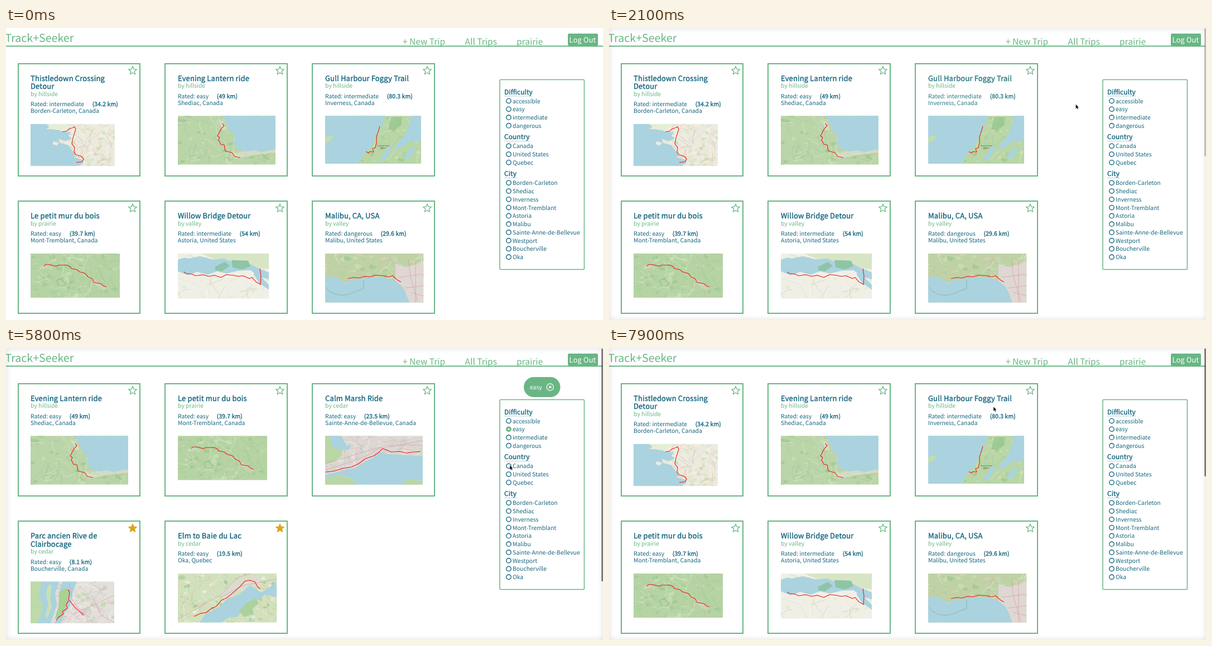
An HTML page that plays this animation: 1070x523 px, repeating every 8000 ms.

```html
<!DOCTYPE html>
<html lang="en">
<head>
<meta charset="utf-8">
<title>Trip list</title>
<style>
html, body { margin: 0; width: 100%; height: 100%; overflow: hidden; background: #fff; }
svg { display: block; --ink: #15667f; }
#stage { position: absolute; left: 0; top: 0; }
#edge { position: absolute; inset: 0; box-shadow: inset 0 0 12px rgba(0, 0, 0, .13); }
text {
  font-family: "Noto Sans CJK JP", "Noto Sans CJK SC", "Noto Sans CJK KR", "Noto Sans CJK", "Open Sans", sans-serif;
  font-size: 10.4px; text-rendering: geometricPrecision; white-space: pre;
}
.ink { fill: var(--ink); }
.brand { font-size: 19.6px; }
.nav { font-size: 15.5px; }
.out { font-size: 13.1px; }
/* A thin outline gives a semibold between regular and bold. */
.title, .head, .km { stroke: var(--ink); stroke-width: .38px; letter-spacing: .15px; }
.title { font-size: 13px; }
.head { font-size: 11.8px; }
.tiny { font-size: 3.4px; }
</style>
</head>
<body>
<svg id="stage" width="1070" height="523" viewBox="0 0 1070 523"></svg>
<div id="edge"></div>
<script>
const GREEN = '#69b684', TEAL = '#15667f', GOLD = '#daa520', WATER = '#aad3df';
const LOOP = 8000;
const $ = id => document.getElementById(id);
const clamp = v => Math.max(0, Math.min(1, v));
const ramp = (t, a, b) => clamp((t - a) / (b - a));

const rgb = hex => [1, 3, 5].map(i => parseInt(hex.slice(i, i + 2), 16));
function mix(a, b, k) {
  const p = rgb(a), q = rgb(b);
  return `rgb(${p.map((v, i) => Math.round(v + (q[i] - v) * k))})`;
}

const label = (x, y, s, cls = '', fill = '') =>
  `<text x="${x}" y="${y}" class="${cls}"${fill && ` fill="${fill}"`}>${s}</text>`;
const shape = (fill, d, more = '') => `<path d="${d}" fill="${fill}" ${more}/>`;
const line = (stroke, d, width = .6, more = '') =>
  `<path d="${d}" fill="none" stroke="${stroke}" stroke-width="${width}" ${more}/>`;

function seeded(seed) {
  return () => {
    seed = (seed * 1664525 + 1013904223) % 4294967296;
    return seed / 4294967296;
  };
}

// Maps: land colour, patch colours, patch and road counts, shapes above, route.
const woods = ['#a2ca92', '#bfdcb0', '#cbdfb7', '#add19e'];
const farms = ['#dbeac8', '#f3eee6', '#cbe2b8', '#e8dccc'];
const town = ['#cec8c4', '#e9e5de', '#c3ddb0', '#dcd2d0'];
const wild = ['#eef0dc', '#9dbd92', '#cfc7ab', '#a3bfa5'];
const lanes = ['#ffffff', '#d4c2ac', '#b9bcb0', '#dba893', '#e6cf9c'];
const streets = ['#ffffff', '#ffffff', '#b8b0ad', '#e3a3ac', '#c5bdb9'];
const MAPS = {
  coast: { w: 151, h: 75.5, land: '#eceade', tints: farms, patches: 110, ways: lanes, roads: 70,
    over: [[WATER, 'M0 0H26L34 5L28 9L46 10L58 14L72 15L68 21L74 26L63 31L50 27L53 34L68 38L74 47L81 53L78 60L92 64L95 69L86 75.5H0Z'],
      ['#e4eed6', 'M30 0H70L62 8L46 11L36 8Z'], ['#eceade', 'M42 31l9 3l-4 5l-8-3z']],
    route: 'M57 14L65 13L69 9L75 7L79 5L81 10L76 25L74 36L79 42L78 50L81 55L91 58L95 63L92 68L82 69' },
  shore: { w: 175, h: 87.5, land: '#bad5a8', tints: woods, patches: 85, ways: wild, roads: 75,
    over: [['#e2dfd2', 'M72 8L82 10L88 25L80 26ZM98 70L122 62L175 61V66L130 71L104 77Z', 'opacity=".7"'],
      [WATER, 'M79 0L86 10L91 24L98 31L103 39L99 48L108 59L122 64L137 62L150 65L175 59V0Z']],
    route: 'M80 14L83 18L78 23L71 36L75 39L73 43L77 51L83 52L85 63L97 66L102 73L112 75' },
  cape: { w: 172, h: 86, land: '#b9d6a6', tints: woods, patches: 65, ways: wild, roads: 40,
    over: [[WATER, 'M0 0H108L103 13L98 25L92 36L87 46L82 57L73 65L66 74L60 86H0Z'],
      [WATER, 'M154 0L150 18L143 35L131 48L124 62L135 58L150 47L172 44V0Z'],
      [WATER, 'M113 57l7-6l-3 14l-8 12l-13 5zM142 72l10-13l12-3l-9 14l-10 9z'],
      ['#c3dcae', 'M0 40L8 34L15 38L8 46L0 49Z'], ['#8fc58b', 'M118 3L138 2L136 17L124 26L113 24Z', 'opacity=".65"']],
    name: [94, 55, 'Gannet Head', 'Island'],
    route: 'M98 19L95 29L92 38L92 49L90 57L85 59L87 65L80 64L78 67L73 64' },
  forest: { w: 160, h: 79.5, land: '#b5d3a3', tints: woods, patches: 85, ways: wild, roads: 60, lakes: 45,
    over: [['none', 'M49 47l7-2l2 5l6 2l-4 6l-9-1l-4-6z', 'stroke="#75a974" stroke-width=".7"'],
      ['#d6d7c3', 'M107 44L126 54L137 60L130 67L113 54ZM16 24l14-5l5 6l-15 4z', 'opacity=".6"']],
    route: 'M24 23L27 20L34 20L46 23L50 21L65 21L70 23L73 27L83 29L88 33L98 36L103 42L110 45L114 52L126 54L130 58L136 60' },
  river: { w: 163.5, h: 81, land: '#f0efe5', tints: ['#f5f3ec', '#e6ebd8', '#f2f0e9', '#e3e9d5'], patches: 45, ways: lanes, roads: 32,
    over: [['#d7e5c5', 'M42 0H163V28L120 22L80 17Z'],
      [WATER, 'M0 5L20 9L40 5L63 11L82 9L98 15L124 16L141 25L163 34V46L146 42L130 30L108 31L88 36L70 32L54 38L34 33L18 39L0 32Z'],
      ['#8ec4a7', 'M67 24L84 15L93 22L79 32L67 30ZM96 12L126 13L130 23L115 29L98 25Z'],
      [WATER, 'M137 27L149 42L163 56V65L146 53L136 38Z'], ['#f0efe5', 'M0 0H22L14 7L0 11Z']],
    route: 'M11 33L15 36L25 37L32 40L45 38L55 41L65 39L77 43L87 38L98 39L108 41L117 40L128 45L133 43L140 51L149 56M147 27L149 41L148 55' },
  beach: { w: 176.5, h: 88, land: '#bfd2a6', tints: [...woods, '#d5d4b5'], patches: 100, ways: lanes, roads: 65,
    over: [['#dfd7d2', 'M126 18L146 25L176 14V88H145L139 63L126 49Z'],
      [WATER, 'M0 41L18 42L30 48L36 56L42 47L60 46L80 43L105 43L119 46L130 52L140 61L146 75L151 88H0Z']],
    lines: ['M149 10L153 42L166 87M132 43L176 37M143 62L176 58M153 70L176 76M162 18V88', 'M0 60Q15 79 40 74L69 63V48'],
    route: 'M41 45L52 43L61 44L71 41L81 42L91 39L105 40L114 42L121 40L130 48L136 51' },
  lake: { w: 175, h: 87.5, land: '#dcd7d3', tints: town, patches: 80, ways: streets, roads: 95,
    over: [['#bad7a4', 'M0 0H21L32 16L29 36L17 46L0 51Z'], [WATER, 'M8 0H29L39 18L47 15L43 25L23 25L11 17Z'],
      [WATER, 'M0 70L33 62L55 57L71 46L87 39L99 29L110 32L135 34L175 36V81L148 77L137 87.5H56L47 76L25 70L0 79Z'],
      ['#b8d7a6', 'M0 76L23 70L46 76L57 88H0ZM134 88L150 77L175 82V88Z']],
    lines: ['M0 49L28 42L62 31L93 22L123 19L175 8M0 61L42 48L78 34L105 17L175 17'],
    route: 'M0 65L17 63L32 58L47 56L60 50L72 41L87 36L97 29L103 23L110 25L118 29L134 28L146 31L157 29L171 28' },
  island: { w: 150, h: 75, land: '#e3dfdb', tints: town, patches: 70, ways: streets, roads: 90,
    over: [['#bedaa8', 'M0 0H28L21 18L24 44L17 75H0Z'],
      [WATER, 'M20 0H52L44 20L47 43L36 75H12L23 46L15 24ZM57 0H83L76 18L71 41L59 61L54 75H43L59 44L51 21Z'],
      ['#a8d193', 'M51 20L61 12L70 15L67 38L55 61L43 68L50 45Z'], ['#c9dfb5', 'M31 8L38 4L35 30L38 46L30 66L26 60L32 42L28 24Z']],
    lines: ['M69 3L75 34L102 68M110 25L126 60L150 74M78 58L150 25'],
    route: 'M67 15L70 19L68 35L64 41L66 48L57 54L59 58L49 65L46 70M70 34L79 46L95 60' },
  bay: { w: 177.5, h: 88, land: '#d2e1bd', tints: [...woods, ...farms], patches: 115, ways: lanes, roads: 75,
    over: [['#e0dbd4', 'M74 37L109 7L141 4L152 20L116 29L92 46Z', 'opacity=".7"'],
      [WATER, 'M177 16L150 34L129 21L108 39L88 46L73 61L49 73L39 88H77L92 79L107 78L119 61L143 48L156 38L177 42Z'],
      ['#add19e', 'M123 53L139 45L145 53L134 63L136 73L119 78L110 67Z']],
    lines: ['M0 82L45 57L80 36L106 8L130 0M75 44L116 22L177 10'],
    route: 'M29 77L40 72L51 70L61 62L69 59L78 48L89 43L101 33L112 23L120 14L128 12L138 15L143 24L148 28' },
  lakes: { w: 166, h: 82.5, land: '#c5daae', tints: [...woods, ...farms], patches: 95, ways: lanes, roads: 50, lakes: 130,
    over: [['#d9ddca', 'M89 18l10-7l7 8l-8 9zM67 57l11 0l4 9l-12 4z'], [WATER, 'M42 62l16-10l-7 13l-14 12l-8 2zM110 59l17-22l3 9l-15 18z']],
    route: 'M96 16L93 23L94 30L89 34L91 43L87 48L88 54L79 57L76 62L73 63' }
};

function drawMap(id, m, seed) {
  const rnd = seeded(seed), pick = list => list[Math.floor(rnd() * list.length)];
  const n = v => v.toFixed(1);
  let out = `<rect width="${m.w}" height="${m.h}" fill="${m.land}"/>`;
  const blob = (fill, size) => {
    const x = rnd() * m.w, y = rnd() * m.h;
    let d = '';
    for (let i = 0; i < 6; i++) {
      const r = size * (.4 + rnd()), a = i * Math.PI / 3;
      d += (i ? 'L' : 'M') + n(x + r * Math.cos(a)) + ' ' + n(y + r * Math.sin(a) * .7);
    }
    return shape(fill, d + 'Z', 'opacity=".8"');
  };
  for (let i = 0; i < m.patches; i++) out += blob(pick(m.tints), 1.5 + rnd() * 5);
  for (let i = 0; i < (m.lakes || 0); i++) {
    const half = m.lakes > 50 && rnd() < .6;
    out += half ? `<g transform="translate(${m.w * .25})">${blob(WATER, 1.4)}</g>` : blob(WATER, .9);
  }
  for (let i = 0; i < m.roads; i++) {
    let x = rnd() * m.w, y = rnd() * m.h, a = rnd() * 6.28, d = `M${n(x)} ${n(y)}`;
    for (let j = 0; j < 5; j++) {
      a += (rnd() - .5) * 1.1;
      x += Math.cos(a) * 6;
      y += Math.sin(a) * 6;
      d += `L${n(x)} ${n(y)}`;
    }
    out += line(pick(m.ways), d, .5);
  }
  m.over.forEach(([fill, d, more]) => out += shape(fill, d, more));
  (m.lines || []).forEach((d, i) => out += line(i ? '#7fa17b' : '#d98fa0', d, .7, 'opacity=".85"'));
  out += line('#8fbdcf', `M0 ${n(m.h * .55)}L${n(m.w * .2)} ${n(m.h * .68)}L${n(m.w * .3)} ${m.h}`, .4, 'opacity=".5"');
  if (m.name) {
    const [x, y, ...rows] = m.name;
    rows.forEach((s, i) => out += label(x + i * 5, y + i * 4, s, 'tiny', '#444'));
  }
  out += line('#f01818', m.route, 1.1, 'stroke-linejoin="round"');
  return `<symbol id="${id}" viewBox="0 0 ${m.w} ${m.h}">${out}</symbol>`;
}

// Trips: title lines, rider, level, distance, place, map, starred.
const TRIPS = {
  bridge: [['Thistledown Crossing', 'Detour'], 'hillside', 'intermediate', '34.2', 'Borden-Carleton, Canada', 'coast'],
  lantern: [['Evening Lantern ride'], 'hillside', 'easy', '49', 'Shediac, Canada', 'shore'],
  gull: [['Gull Harbour Foggy Trail'], 'hillside', 'intermediate', '80.3', 'Inverness, Canada', 'cape'],
  mur: [['Le petit mur du bois'], 'prairie', 'easy', '39.7', 'Mont-Tremblant, Canada', 'forest'],
  willow: [['Willow Bridge Detour'], 'valley', 'intermediate', '54', 'Astoria, United States', 'river'],
  malibu: [['Malibu, CA, USA'], 'valley', 'dangerous', '29.6', 'Malibu, United States', 'beach'],
  marsh: [['Calm Marsh Ride'], 'cedar', 'easy', '23.5', 'Sainte-Anne-de-Bellevue, Canada', 'lake'],
  parc: [['Parc ancien Rive de', 'Clairbocage'], 'cedar', 'easy', '8.1', 'Boucherville, Canada', 'island', true],
  elm: [['Elm to Baie du Lac'], 'cedar', 'easy', '19.5', 'Oka, Quebec', 'bay', true],
  garden: [['Garden Charity Ride'], 'cedar', 'dangerous', '36.4', 'Westport, Canada', 'lakes', true]
};
const VIEWS = {
  all: ['bridge', 'lantern', 'gull', 'mur', 'willow', 'malibu'],
  easy: ['lantern', 'mur', 'marsh', 'parc', 'elm'],
  canada: ['bridge', 'lantern', 'gull', 'mur', 'marsh', 'garden']
};

function star(x, y, on) {
  const pts = Array.from({ length: 10 }, (_, i) => {
    const r = i % 2 ? 3.5 : 7.8, a = i * Math.PI / 5;
    return `${(x + r * Math.sin(a)).toFixed(1)},${(y - r * Math.cos(a)).toFixed(1)}`;
  }).join(' ');
  return `<polygon points="${pts}" fill="${on ? GOLD : '#fff'}" stroke="${on ? GOLD : GREEN}" stroke-width="1.3" stroke-linejoin="round"/>`;
}

function card(key, i) {
  const [title, rider, level, km, place, map, on] = TRIPS[key];
  const x = 21 + (i % 3) * 264, y = 63 + Math.floor(i / 3) * 246.5;
  const left = Math.floor(21 + (i % 3) * 263.7), top = Math.floor(y);
  const tx = x + 23, dy = y + (title.length - 1) * 14.5, m = MAPS[map];
  return `<g><rect x="${left + 1}" y="${top + 1}" width="${x + 218 - left}" height="201" fill="#fff" stroke="${GREEN}" stroke-width="2"/>` +
    star(x + 206, y + 13.5, on) +
    '<g class="ink">' +
    title.map((s, j) => label(tx, y + 31.7 + j * 14.6, s, 'title')).join('') +
    label(tx, dy + 62.8, `Rated: ${level}<tspan class="km" dx="14.6">(${km} km)</tspan>`) +
    label(tx, dy + 74.5, place) + '</g>' +
    label(tx, dy + 44, 'by ' + rider, '', GREEN) +
    `<use href="#${map}" x="${tx}" y="${dy + 94.2}" width="${m.w}" height="${m.h}"/></g>`;
}

const FILTERS = [
  ['Difficulty', 118.5, 130.6, 51, ['accessible', 'easy', 'intermediate', 'dangerous']],
  ['Country', 199.3, 211.3, 46, ['Canada', 'United States', 'Quebec']],
  ['City', 265.2, 277.3, 23, ['Borden-Carleton', 'Shediac', 'Inverness', 'Mont-Tremblant', 'Astoria',
    'Malibu', 'Sainte-Anne-de-Bellevue', 'Westport', 'Boucherville', 'Oka']]
];

const filterGroup = ([head, hy, y0, w, rows]) =>
  label(893, hy, head, 'head ink') +
  `<rect x="893" y="${hy + 3}" width="${w}" height=".8" fill="${TEAL}" opacity=".4"/>` +
  rows.map((s, i) => {
    const y = y0 + i * 14.77;
    return `<circle id="r-${s}" cx="901" cy="${y}" r="4.2" fill="#fff" stroke="${TEAL}" stroke-width="1.4"/>` +
      label(908, y + 3.9, s, 'ink');
  }).join('');

function chip(id, x, w, s) {
  const cx = x + w - 18.3;
  return `<g id="chip-${id}"><rect x="${x}" y="52" width="${w}" height="36" rx="18" fill="${GREEN}"/>` +
    label(x + 11, 74, s, '', '#fff') +
    `<circle cx="${cx}" cy="70" r="6.2" fill="none" stroke="#fff" stroke-width="1.2"/>` +
    line('#fff', `M${cx - 2.3} 67.7l4.6 4.6m0-4.6l-4.6 4.6`, 1.3) + '</g>';
}

$('stage').innerHTML =
  `<defs><linearGradient id="sweep"><stop stop-color="${TEAL}"/><stop offset=".48" stop-color="${GREEN}"/></linearGradient>` +
  Object.keys(MAPS).map((id, i) => drawMap(id, MAPS[id], 71 + i * 977)).join('') + '</defs>' +
  label(-1.5, 25, 'Track+Seeker', 'brand', GREEN) +
  `<rect y="31.5" width="1070" height="2" fill="${GREEN}"/>` +
  label(711, 29.8, '+ New Trip', 'nav', GREEN) + label(822.6, 29.8, 'All Trips', 'nav', GREEN) +
  label(915, 29.8, 'prairie', 'nav', GREEN) +
  `<rect x="1007" y="10" width="54" height="22" rx="2" fill="${GREEN}"/>` +
  label(1009.5, 26, 'Log Out', 'out', '#fff') +
  Object.keys(VIEWS).map(v => `<g id="view-${v}">${VIEWS[v].map(card).join('')}</g>`).join('') +
  `<rect x="885" y="92.6" width="151.4" height="340" rx="2" fill="#fff" stroke="${GREEN}" stroke-width="1.5"/>` +
  FILTERS.map(filterGroup).join('') +
  chip('easy', 928, 65.5, 'easy') + chip('canada', 920, 81, 'Canada') +
  '<rect id="bar" x="1067.5" y="1" width="2" rx="1"/>' +
  '<g id="cursor"><path id="arrow" d="M0 0V8.2L1.9 6.5L3.3 9.3L4.7 8.6L3.4 6H5.8Z" fill="#000" stroke="#fff" stroke-width=".4"/>' +
  '<path id="hand" d="M.4 1.2Q1.3-.1 2.2 1.2L4 3.6L6.4 2.8L8.4 4.4L8.8 7L6.8 9.4L3.9 9L.6 5.8L1.3 4.9L2.7 5.4Z" fill="#fff" stroke="#444" stroke-width=".8"/></g>';

const PATH = [
  [1000, 130, 185], [1300, 236, 165], [1400, 470, 140], [1500, 723, 117], [1800, 768, 126],
  [2400, 905, 147], [3100, 905, 147], [3300, 903, 145], [4200, 903, 145], [4800, 902, 209],
  [4900, 902, 209], [5000, 903, 210], [5900, 903, 210], [6600, 934, 79], [7100, 983, 68],
  [7200, 983, 68], [7300, 982, 67], [7500, 982, 67], [7900, 689, 105]
];

function cursorAt(t) {
  const i = Math.max(1, PATH.findIndex(p => p[0] >= t));
  const [t0, x0, y0] = PATH[i - 1], [t1, x1, y1] = PATH[i];
  const k = ramp(t, t0, t1);
  return [x0 + (x1 - x0) * k, y0 + (y1 - y0) * k];
}

const show = (id, on) => $(id).setAttribute('display', on ? 'inline' : 'none');

function setRadio(name, k) {
  const r = $('r-' + name), w = 1.4 + 1.8 * k;
  r.setAttribute('r', 4.9 - w / 2);
  r.setAttribute('stroke-width', w);
  r.setAttribute('stroke', mix(TEAL, GREEN, k));
}

const homeCards = $('view-all').children;
function setHover(i, t, from, to) {
  const peak = ramp(to, from, from + 500);
  const k = t < to ? ramp(t, from, from + 500) : Math.max(0, peak - (t - to) / 500);
  homeCards[i].style.setProperty('--ink', mix(TEAL, GREEN, k));
  homeCards[i].querySelector('rect').setAttribute('stroke', t >= from && t < to ? 'url(#sweep)' : GREEN);
}

function render(t) {
  const view = t < 3600 || t >= 7500 ? 'all' : t < 5900 ? 'easy' : 'canada';
  for (const v in VIEWS) show('view-' + v, v === view);
  show('chip-easy', view === 'easy');
  show('chip-canada', view === 'canada');

  setHover(0, t, 1000, 1350);
  setHover(2, t, 1480, 1850);
  setRadio('easy', ramp(t, 3500, 3800) - ramp(t, 5900, 6200));
  setRadio('Canada', ramp(t, 5900, 6200) - ramp(t, 7400, 7700));

  show('bar', t >= 1000);
  $('bar').setAttribute('height', { all: 229, easy: 417, canada: 295 }[view]);
  $('bar').setAttribute('fill', t < 2800 ? '#b0b0b0' : '#555');
  $('edge').style.opacity = t < 100 ? 0 : 1;

  const hand = t < 1800 || (t >= 7100 && t < 7600);
  const [x, y] = cursorAt(t);
  show('cursor', t >= 1000);
  show('hand', hand);
  show('arrow', !hand);
  $('cursor').setAttribute('transform', `translate(${x.toFixed(1)} ${y.toFixed(1)})`);
}

// The picture advances in steps of 100 ms.
const start = performance.now();
let last = -1;
function tick() {
  const t = Math.floor((performance.now() - start) % LOOP / 100) * 100;
  if (t !== last) render(last = t);
  requestAnimationFrame(tick);
}
tick();
</script>
</body>
</html>
```
